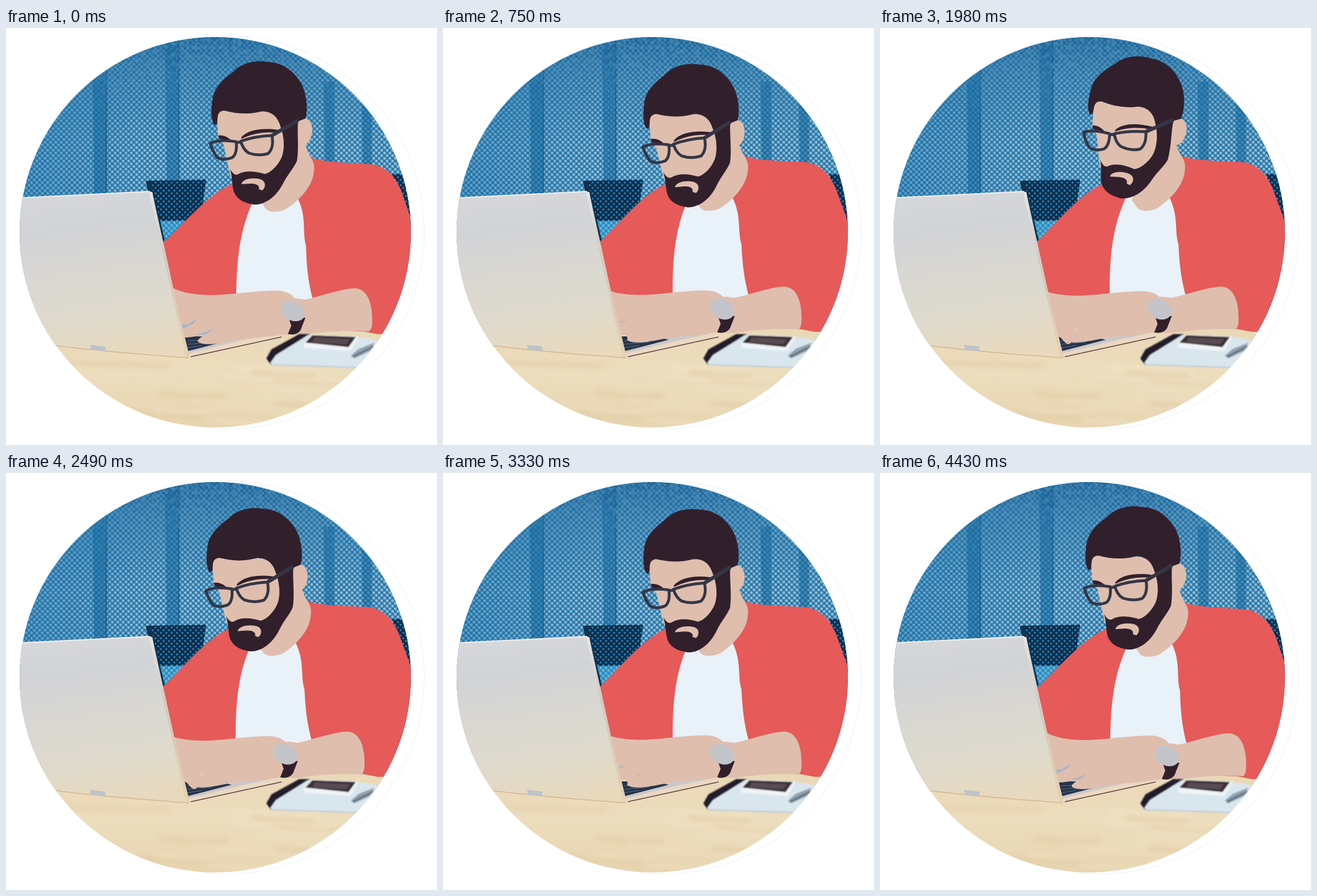
An HTML page for the animation above (4.53 s loop, 760x737 px).

```html
<!DOCTYPE html>
<html lang="en">
<head>
<meta charset="utf-8">
<title>Man typing on a laptop</title>
<style>
html, body { margin: 0; width: 100%; height: 100%; overflow: hidden; background: #fff; }
svg { display: block; width: 760px; height: 737px; --lean: 0; --look: 0; --bob: 0; --open: 1; }
.skin { fill: #dfbeae; }
.dark { fill: #31202c; }
.body {
  transform-origin: 0 520px;
  transform: translate(0, calc(var(--lean) * 4.5px)) matrix(1, calc(var(--lean) * -.013), calc(var(--lean) * .02), 1, 0, 0);
}
.arm { transform: translate(calc(var(--lean) * -13.5px), calc(var(--lean) * -3px)); }
.head {
  transform-origin: 530px 185px;
  transform:
    translate(calc((var(--look) - var(--lean)) * 8px), calc(var(--lean) * 2px - var(--look) * 1.5px + var(--bob) * 3px))
    rotate(calc(var(--look) * 7.5deg - var(--lean) * .8deg - var(--bob) * 1.2deg));
}
.back { transform: translateY(calc((1 - var(--open)) * 4px)); }
.tips { transform: translate(calc(var(--open) * 6px), calc(var(--open) * -16px)); }
.slit { transform-box: fill-box; transform-origin: 100% 30%; transform: scale(var(--open)); }
</style>
</head>
<body>
<svg viewBox="0 0 760 737">
  <defs>
    <clipPath id="disc"><circle cx="369" cy="361" r="345"/></clipPath>
    <pattern id="mesh" width="9.5" height="9.5" patternUnits="userSpaceOnUse">
      <g fill="#9dbaca">
        <circle cx="2.4" cy="2.4" r="2.5"/><circle cx="7.1" cy="7.1" r="2.5"/>
      </g>
    </pattern>
    <pattern id="chair" width="9.5" height="9.5" patternUnits="userSpaceOnUse">
      <rect width="9.5" height="9.5" fill="#0e2b47"/>
      <g fill="#1d86c0">
        <circle cx="2.4" cy="2.4" r="1.9"/><circle cx="7.1" cy="7.1" r="1.9"/>
      </g>
    </pattern>
    <linearGradient id="shade" x1="0" y1="0" x2="0" y2="1">
      <stop offset="0" stop-color="#175a90" stop-opacity=".85"/>
      <stop offset=".35" stop-color="#1b689f" stop-opacity=".45"/>
      <stop offset="1" stop-color="#2173a8" stop-opacity="0"/>
    </linearGradient>
    <linearGradient id="left" x1="0" x2="1">
      <stop offset="0" stop-color="#1a72ad" stop-opacity=".45"/>
      <stop offset="1" stop-color="#1a72ad" stop-opacity="0"/>
    </linearGradient>
    <linearGradient id="fade" x1="0" y1="0" x2="0" y2="1">
      <stop offset="0" stop-color="#fff"/>
      <stop offset="1" stop-color="#000"/>
    </linearGradient>
    <mask id="top"><rect width="760" height="170" fill="url(#fade)"/></mask>
    <filter id="mottle" x="0" y="0" width="1" height="1">
      <feTurbulence type="fractalNoise" baseFrequency=".13" numOctaves="2" seed="4"/>
      <feColorMatrix values="0 0 0 0 .08  0 0 0 0 .3  0 0 0 0 .5  4 0 0 0 -1.7"/>
    </filter>
    <linearGradient id="lid" x1=".45" y1="0" x2=".6" y2="1">
      <stop offset="0" stop-color="#d6d7da"/>
      <stop offset=".2" stop-color="#d1d3d7"/>
      <stop offset=".45" stop-color="#d9d7d2"/>
      <stop offset=".75" stop-color="#dfdacc"/>
      <stop offset="1" stop-color="#e9d9bc"/>
    </linearGradient>
    <linearGradient id="edge" x1="0" y1="0" x2="0" y2="1">
      <stop offset="0" stop-color="#e6e5e6"/>
      <stop offset=".4" stop-color="#d2c8bd"/>
      <stop offset="1" stop-color="#e6d0b0"/>
    </linearGradient>
    <linearGradient id="desk" x1="0" y1="0" x2="0" y2="1">
      <stop offset="0" stop-color="#e9d7b5"/>
      <stop offset=".4" stop-color="#ecddbd"/>
      <stop offset="1" stop-color="#e6d2ab"/>
    </linearGradient>
    <filter id="soft" x="-20%" y="-50%" width="140%" height="200%"><feGaussianBlur stdDeviation="4"/></filter>
    <filter id="blur"><feGaussianBlur stdDeviation=".8"/></filter>
  </defs>

  <circle cx="390" cy="361" r="347.5" fill="#fff" stroke="#edf1f4"/>

  <g clip-path="url(#disc)">
    <!-- wall -->
    <rect width="760" height="560" fill="#1f79b1"/>
    <rect width="760" height="560" fill="url(#mesh)"/>
    <rect x="24" y="16" width="250" height="300" fill="url(#left)"/>
    <path d="M153 60H177V300H155ZM281 16H305V275H283ZM560 95H579V240H562ZM627 120H645V245H629Z" fill="#10649b" opacity=".55"/>
    <path d="M177 70V292M305 16V268" stroke="#124e7c" stroke-width="2.5" opacity=".55"/>
    <rect width="760" height="210" fill="url(#shade)"/>
    <g mask="url(#top)"><rect width="760" height="170" filter="url(#mottle)" opacity=".7"/></g>
    <path d="M250 341H345V400H260Z" fill="#1e8fca"/>
    <path d="M250 341H345V400H260Z" fill="url(#mesh)" opacity=".7"/>
    <path d="M247 270L353 268 343 340 263 341Z" fill="url(#chair)"/>
    <path d="M247 272L255 270 280 375 270 380Z" fill="#11334f"/>
    <path d="M681 258H730V380H715Z" fill="url(#chair)"/>

    <!-- desk -->
    <rect y="525" width="760" height="212" fill="url(#desk)"/>
    <g id="grain" fill="none" filter="url(#soft)" opacity=".4"/>

    <!-- laptop base -->
    <path d="M300 545L482 541 487 546 324 583 300 575Z" fill="#ead8c2"/>
    <path d="M310 546L470 541 420 551 322 575Z" fill="#cbc8c8"/>
    <path d="M314 545H372L398 551 321 571Z" fill="#26344a"/>
    <g id="keys" stroke="#5d7086"/>
    <path d="M326 581L486 546" stroke="#5a3f3c" stroke-width="1.6"/>

    <!-- jacket, shirt, neck -->
    <g class="body">
      <path fill="#e65a59" d="M255 400C305 358 350 296 400 275L450 285 529 224C545 236 575 237 645 241C674 246 691 268 700 296C712 332 726 366 735 420V541H655L630 536 300 525Z"/>
      <path fill="#e9f1f9" d="M440 297C416 345 406 395 406 480H541C532 445 530 420 529 385C522 360 531 335 514 300Z"/>
      <path class="skin" d="M528 205C532 228 546 232 543 252C542 280 515 307 492 321C478 327 461 326 457 318L448 305 495 210Z"/>
    </g>

    <!-- hands and forearm -->
    <g class="arm">
      <path class="skin back" d="M280 450C305 470 335 472 370 472C410 470 440 464 480 464C500 466 508 474 513 484L500 515H290Z"/>
      <path class="skin" d="M285 478H514L527 480C560 473 590 461 615 460C634 461 642 478 645 500C646 520 647 531 640 536C605 533 560 537 525 542L497 541C465 546 425 549 410 551C375 558 348 563 338 554C338 547 356 541 364 533L345 542C330 547 320 547 290 548Z"/>
      <path class="skin tips" d="M285 505L350 520 362 550 346 562C338 560 336 552 330 549L285 548Z"/>
      <path class="slit" fill="#a9b5c7" d="M306 525L322 523 337 513 331 522 306 535Z"/>
      <path class="slit" fill="#a9b5c7" d="M334 545L343 540 366 532 352 542Z"/>
      <path class="dark" d="M499 514L503 526 497 541C510 544 519 538 521 530L528 512Z"/>
      <ellipse cx="506" cy="500" rx="22.5" ry="17" transform="rotate(28 506 500)" fill="#c3c4ca"/>
    </g>

    <!-- head -->
    <g class="head">
      <path class="skin" d="M372 145L374 192 384 207 390 236 396 262 440 290 500 260 516 150Z"/>
      <path class="skin" d="M509 166C523 154 540 158 540 181C539 200 528 212 512 208Z"/>
      <path class="dark" d="M368 172C361 163 361 148 364 126C367 104 386 88 400 78C415 62 438 56 462 60C492 61 515 82 525 108C531 125 532 146 528 160L515 165C513 185 517 210 513 235C506 250 497 258 489 274C476 300 455 313 437 312C418 309 407 302 402 290C398 278 400 266 395 249C399 256 404 262 410 258C425 250 442 254 456 258C468 256 482 240 487 226C492 210 490 190 484 174C480 160 472 148 452 147C425 154 405 151 385 146C371 147 374 158 372 169Z"/>
      <path class="skin" d="M415 276C418 265 440 264 450 268C459 272 458 282 452 287L446 285C448 276 438 275 430 275Z"/>
      <path class="dark" d="M374 190C385 188 395 195 399 201L376 196ZM415 193C427 180 450 176 479 180V185C452 183 434 187 415 196Z"/>
      <g fill="none" stroke="#343645" stroke-width="5" stroke-linejoin="round">
        <path d="M360 204Q375 196 406 201Q408 222 399 229Q383 235 373 229Q365 220 360 204Z"/>
        <path d="M414 200Q440 191 469 190Q473 212 462 222Q445 227 428 221Q418 215 414 200Z"/>
        <path d="M405 204Q410 200 416 203"/>
        <path d="M469 190L515 163" stroke-width="6.5"/>
      </g>
    </g>

    <!-- laptop lid -->
    <path d="M10 301L250 288 258 291 322 583C240 576 140 568 70 558L10 480Z" fill="url(#lid)"/>
    <path d="M252 289L258 290C270 360 298 475 324 582L317 582C294 470 268 365 252 289Z" fill="url(#edge)"/>
    <path d="M10 301L254 289" stroke="#eff0f2" stroke-width="2"/>
    <path d="M70 559C140 569 240 577 322 583" fill="none" stroke="#d2b48f" stroke-width="1.6"/>
    <path d="M148 560L175 563V571L150 569Z" fill="#bcc3c9"/>

    <!-- notebook, phone, pen -->
    <g filter="url(#blur)">
      <path d="M459 584L468 568 517 541H536L476 582 467 595Z" fill="#241d2b"/>
      <path d="M466 592L476 578 532 543 640 548 665 556 622 601 470 596Z" fill="#dae6ee"/>
      <path d="M468 595L622 600" stroke="#bccad5" stroke-width="2"/>
      <path d="M525 558L539 542 622 545 607 571 526 565Z" fill="#eff4f7"/>
      <path d="M528 556L540 543 617 546 604 564Z" fill="#3a2d35"/>
      <path d="M544 547L607 550 600 559 540 556Z" fill="#594c52"/>
      <path d="M608 579L622 567 650 556 642 571 614 584Z" fill="#8fa0ae"/>
      <path d="M612 581L648 563" stroke="#4e5c69" stroke-width="2.5"/>
    </g>
  </g>
</svg>
<script>
const LOOP = 4530, STROKE = 540;
const svg = document.querySelector('svg');

function addPath(id, d, attrs) {
  const path = document.createElementNS('http://www.w3.org/2000/svg', 'path');
  for (const [name, value] of Object.entries({ d, ...attrs })) path.setAttribute(name, value);
  document.getElementById(id).append(path);
}

let seed = 7;
const random = () => (seed = seed * 16807 % 2147483647) / 2147483647;

// wood grain
for (let i = 0; i < 18; i++) {
  const x = 90 + 420 * random(), y = 590 + i * 6, w = 80 + 130 * random();
  addPath('grain', `M${x} ${y}q${w / 2} ${4 + 8 * random()} ${w} 6`, {
    stroke: i % 3 ? '#f3e6cb' : '#dcc194',
    'stroke-width': 5 + 5 * random()
  });
}

// key rows
for (let i = 0; i < 3; i++) addPath('keys', `M320 ${553 + 6 * i}l${62 - 18 * i} -4`);

// smooth 0 to 1 between two times
function ease(t, from, to) {
  const x = Math.min(1, Math.max(0, (t - from) / (to - from)));
  return x * x * (3 - 2 * x);
}

function draw(t) {
  const lean = ease(t, 0, 500) - ease(t, 3960, 4430);
  const look = ease(t, 1080, 1480) - ease(t, 2190, 2490);
  const tap = Math.max(0, Math.cos(2 * Math.PI * (t - 150) / STROKE)) ** 4;
  const pose = { lean, look, bob: tap * lean * (1 - look), open: Math.max(tap, 1 - lean) };
  for (const name in pose) svg.style.setProperty('--' + name, pose[name].toFixed(4));
}

function tick() {
  draw(performance.now() % LOOP);
  requestAnimationFrame(tick);
}
tick();
</script>
</body>
</html>
```
